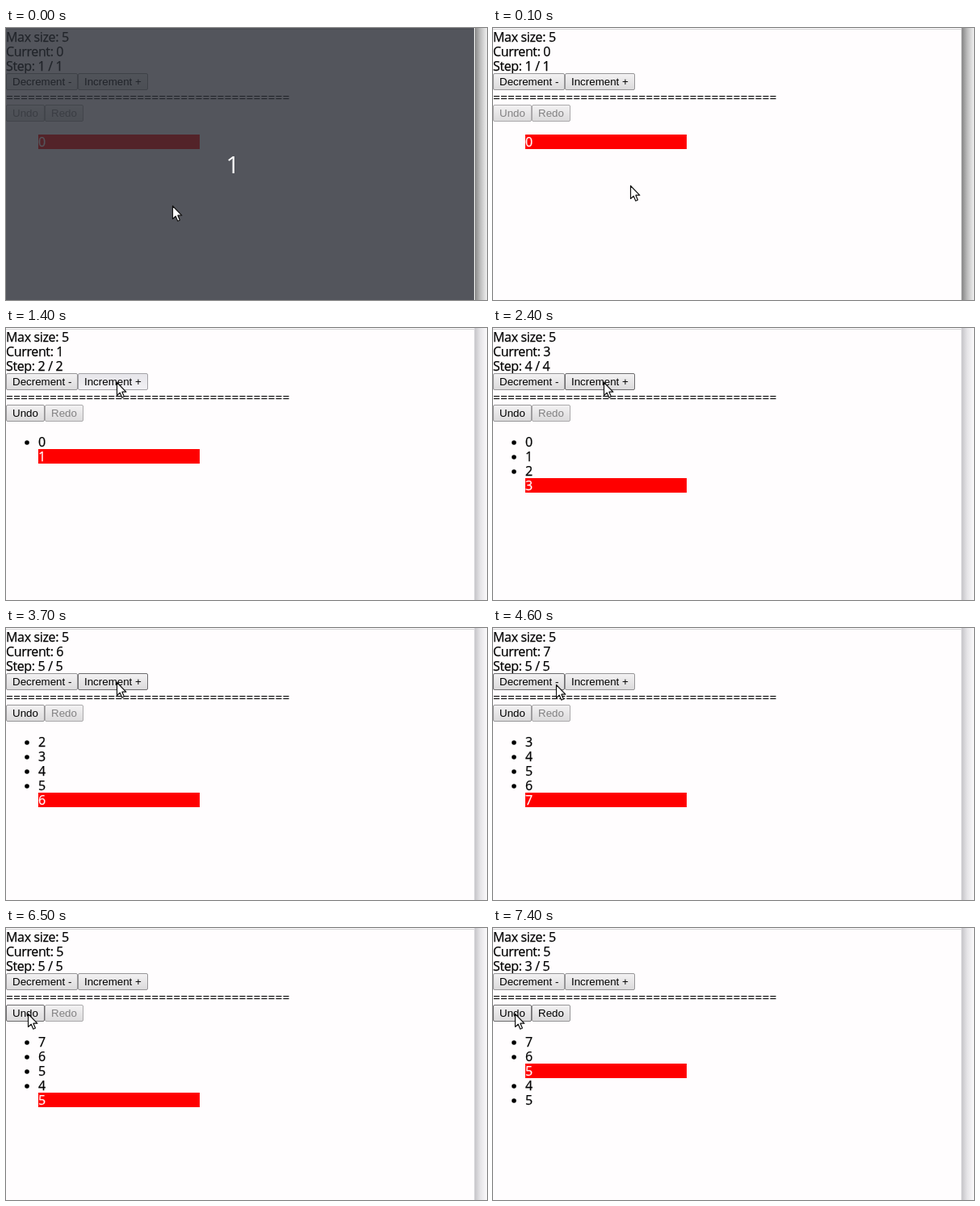
Animation, 596 px wide and 337 px high, one loop 8000 ms. Source, as an HTML page:

```html
<!DOCTYPE html>
<html lang="en">
<head>
<meta charset="utf-8">
<title>Undo history counter</title>
<style>
  html, body { margin: 0; width: 100%; height: 100%; overflow: hidden; background: #fffdfe; }
  svg { display: block; width: 596px; height: 337px; }
  text { white-space: pre; }
  .body { font: 16px "Open Sans", "Noto Sans", sans-serif; letter-spacing: -.35px; stroke-width: .25px; }
  .rule { font: 15.78px "Open Sans", "Noto Sans", sans-serif; }
  .label { font: 13.333px "Liberation Sans", Arial, sans-serif; }
  .count { font: 30px "Open Sans", "Noto Sans", sans-serif; }
</style>
</head>
<body>
<svg id="stage" viewBox="0 0 596 337" xmlns="http://www.w3.org/2000/svg">
  <defs>
    <linearGradient id="face" x2="0" y2="1">
      <stop stop-color="#f3f2f3"/><stop offset="1" stop-color="#dbdadb"/>
    </linearGradient>
    <linearGradient id="down" x2="0" y2="1">
      <stop stop-color="#e6e5ea"/><stop offset="1" stop-color="#f2f1f4"/>
    </linearGradient>
    <linearGradient id="dark">
      <stop stop-color="#868686"/><stop offset=".45" stop-color="#bdbdbd"/><stop offset="1" stop-color="#f0f0f0"/>
    </linearGradient>
    <linearGradient id="soft">
      <stop stop-color="#c6c5c9"/><stop offset=".45" stop-color="#e6e5e8"/><stop offset="1" stop-color="#fbfafb"/>
    </linearGradient>
  </defs>
</svg>
<script>
const LOOP = 8000, TICK = 100, SIZE = 5, ROW = 18;
const stage = document.getElementById('stage');

function set(el, attrs) {
  for (const k in attrs) el.setAttribute(k, attrs[k]);
}
function add(tag, attrs, text = '') {
  const el = document.createElementNS('http://www.w3.org/2000/svg', tag);
  set(el, attrs);
  el.textContent = text;
  stage.appendChild(el);
  return el;
}
function show(el, on) {
  el.style.display = on ? '' : 'none';
}
const line = y => add('text', { y, class: 'body', stroke: '#000' });

function button(x, y, w, label) {
  const box = add('rect', { x: x + .5, y: y + .5, width: w - 1, height: 20, rx: 1.5 });
  const text = add('text', { x: x + 8, y: y + 15, class: 'label' }, label);
  const hit = ([px, py]) => px >= x && px < x + w && py >= y && py < y + 21;
  function paint(tip, pressed, enabled = true) {
    const over = enabled && hit(tip), held = over && pressed;
    set(box, {
      fill: held ? 'url(#down)' : 'url(#face)',
      stroke: held ? '#a3a2a6' : over ? '#6c6b6d' : enabled ? '#969597' : '#aba9ab'
    });
    set(text, { fill: enabled ? '#000' : '#828182' });
  }
  return { hit, paint };
}

add('rect', { width: 596, height: 337, fill: '#fffdfe' });
add('rect', { y: 1, width: 581, height: 1, fill: '#d3d2d4' });
const edge = add('rect', { x: 580, width: 1, height: 337 });
const shadow = add('rect', { x: 581, width: 15, height: 337 });

const size = line(17), current = line(35), step = line(53);
size.textContent = 'Max size: ' + SIZE;
add('text', { y: 92, class: 'rule' }, '='.repeat(39));
const dec = button(0, 56, 89, 'Decrement -');
const inc = button(89, 56, 87, 'Increment +');
const undo = button(0, 95, 48, 'Undo');
const redo = button(48, 95, 48, 'Redo');

const bar = add('rect', { x: 40, width: 200, height: ROW, fill: '#f00' });
const rows = Array.from({ length: SIZE }, (_, i) => ({
  dot: add('circle', { cx: 26, cy: 142 + ROW * i, r: 2.8 }),
  text: add('text', { x: 40, y: 147 + ROW * i, class: 'body' })
}));

const dim = add('rect', { width: 580, height: 337, fill: '#282c34', opacity: .8 });
const count = add('text', { x: 281, y: 180, class: 'count', fill: '#fff', 'text-anchor': 'middle' }, '1');
const pointer = add('path', {
  d: 'M.5 .5V16.5L4.2 13.2L6.8 19.2L9.4 18L6.9 12.2H11.8Z',
  fill: '#fff', stroke: '#111', 'stroke-width': 1.2, 'stroke-linejoin': 'round'
});

// Pointer trips between resting places
const trips = [
  { from: 100, to: 700, x: 137, y: 67 },
  { from: 4200, to: 4900, x: 65, y: 71 },
  { from: 5800, to: 5900, x: 137, y: 67 },
  { from: 6200, to: 6500, x: 27, y: 106 }
];
const easeOut = k => 1 - (1 - k) ** 2;

function pointerAt(t) {
  let [x, y] = t < TICK ? [206, 220] : [170, 195];
  for (const trip of trips) {
    const k = easeOut(Math.min(1, Math.max(0, (t - trip.from) / (trip.to - trip.from))));
    x += (trip.x - x) * k;
    y += (trip.y - y) * k;
  }
  return [Math.round(x), Math.round(y)];
}

// Each click acts on the button under the pointer, one tick after the press
const clicks = [1100, 1500, 1900, 2600, 3300, 3700, 4200, 5100, 5500, 5800, 6200, 6900, 7400];

function historyAt(t) {
  let list = [0], at = 0;
  for (const time of clicks.filter(c => c <= t)) {
    const tip = pointerAt(time);
    if (undo.hit(tip)) {
      at--;
    } else {
      const next = list[at] + (inc.hit(tip) ? 1 : -1);
      list = [...list.slice(0, at + 1), next].slice(-SIZE);
      at = list.length - 1;
    }
  }
  return { list, at };
}

function draw(ms) {
  const t = Math.floor(ms / TICK) * TICK;
  const tip = pointerAt(t), { list, at } = historyAt(t);
  const pressed = clicks.includes(t + TICK);
  const intro = t < TICK, unfocused = t < clicks[0] - TICK;

  current.textContent = 'Current: ' + list[at];
  step.textContent = `Step: ${at + 1} / ${list.length}`;
  dec.paint(tip, pressed);
  inc.paint(tip, pressed);
  undo.paint(tip, pressed, at > 0);
  redo.paint(tip, pressed, at < list.length - 1);

  set(bar, { y: 132 + ROW * at });
  rows.forEach(({ dot, text }, i) => {
    const ink = i === at ? '#fff' : '#000';
    show(dot, i < list.length && i !== at);
    text.textContent = list[i] ?? '';
    set(text, { fill: ink, stroke: ink });
  });

  show(dim, intro);
  show(count, intro);
  set(edge, { fill: intro ? '#f4f4f4' : unfocused ? '#c4c3c4' : '#dcdbde' });
  set(shadow, { fill: unfocused ? 'url(#dark)' : 'url(#soft)' });
  set(pointer, { transform: `translate(${tip})` });
}

const start = performance.now();
function tick() {
  draw((performance.now() - start) % LOOP);
  requestAnimationFrame(tick);
}
tick();
</script>
</body>
</html>
```
